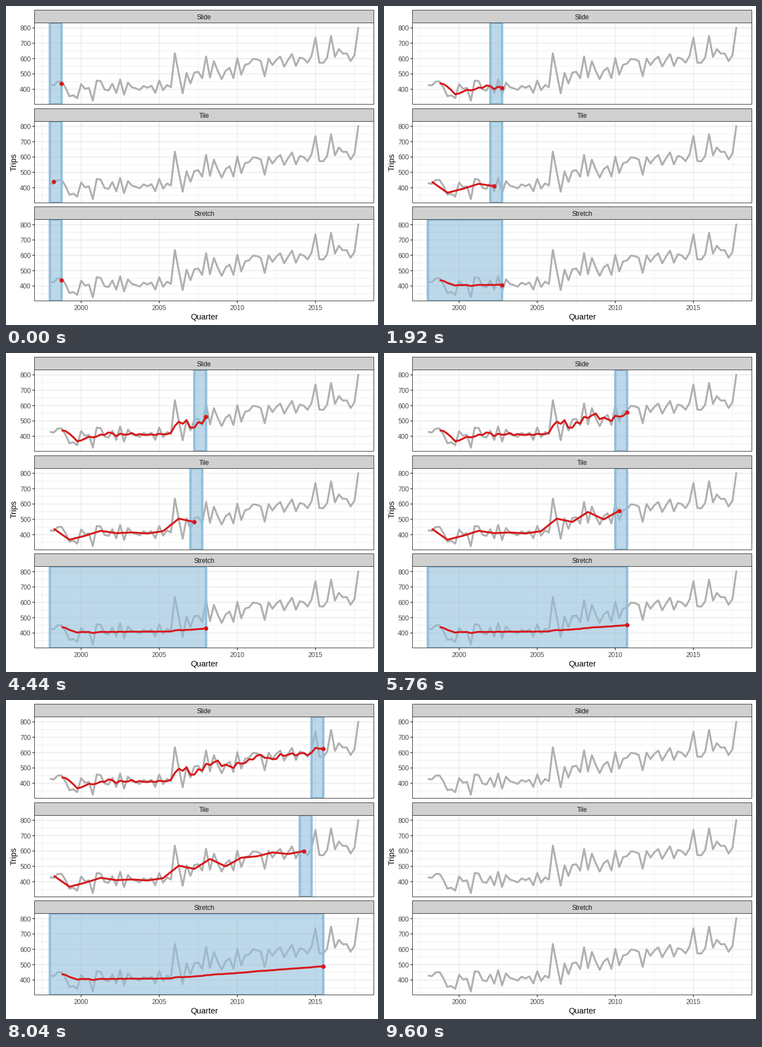
A matplotlib script that plays this animation: 672x576 px, repeating every 9720 ms.

```python
import numpy as np
import matplotlib.pyplot as plt
from matplotlib.animation import FuncAnimation
from matplotlib.patches import Rectangle

W, H, DPI = 672, 576, 96
PX = 72 / DPI  # one pixel in points
FRAMES, INTERVAL = 81, 120
SPAN = 4  # quarters per window

plt.rcParams["font.family"] = "Liberation Sans"
plt.rcParams["path.snap"] = False

LEFT, RIGHT, PANEL_H, STRIP_H = 51.5, 664.5, 147, 23
TOPS = (30.5, 208.2, 385.7)
DARK, GRID, GREY = "#383838", "#E8E8E8", "#B0B0B0"
BLUE, RED = "#91BFDB", "#D7191C"

trips = np.array([
    429, 425, 450, 451, 411, 355, 361, 342, 434, 403, 409, 326,
    457, 453, 399, 392, 436, 376, 464, 365, 443, 414, 406, 396,
    422, 410, 423, 377, 457, 394, 428, 414, 635, 502, 374, 507,
    438, 509, 514, 472, 614, 477, 583, 519, 466, 520, 540, 473,
    603, 495, 560, 567, 598, 595, 584, 485, 600, 558, 592, 613,
    548, 592, 630, 552, 607, 599, 573, 617, 737, 574, 572, 606,
    748, 611, 662, 633, 634, 584, 622, 806])
quarters = 1998 + np.arange(len(trips)) / 4

sums = np.cumsum(trips)
slide = np.convolve(trips, np.ones(SPAN) / SPAN, "valid")
tile = trips.reshape(-1, SPAN).mean(axis=1)
stretch = (sums / np.arange(1, len(trips) + 1))[SPAN - 1:]


def x_of(year):
    return 79.25 + 28.22 * (np.asarray(year) - 1998)


def y_of(value, top):
    return top + 119.9 - 0.2772 * (np.asarray(value) - 400)


fig = plt.figure(figsize=(W / DPI, H / DPI), dpi=DPI, facecolor="white")
ax = fig.add_axes([0, 0, 1, 1])
ax.set_xlim(0, W)
ax.set_ylim(H, 0)
ax.axis("off")


def line(xs, ys, color, width, z, clip=None):
    artist, = ax.plot(xs, ys, color=color, lw=width * PX, zorder=z,
                      solid_capstyle="butt", solid_joinstyle="round")
    if clip is not None:
        artist.set_clip_path(clip)
    return artist


def label(x, y, text, px, color, ha="center", **kw):
    ax.text(x, y, text, fontsize=px * PX, color=color, ha=ha,
            va="baseline", **kw)


def box(top, height, fill, z):
    patch = Rectangle((LEFT, np.floor(top) + 0.5), RIGHT - LEFT, height,
                      fc=fill, ec=DARK, lw=PX, zorder=z)
    return ax.add_patch(patch)


class Panel:
    def __init__(self, top, title, xs, means):
        self.top = top
        self.xs, self.ys = x_of(xs), y_of(means, top)
        bottom = top + PANEL_H
        clip = Rectangle((LEFT, top), RIGHT - LEFT, PANEL_H,
                         transform=ax.transData)

        for year in np.arange(1997.5, 2018, 2.5):
            width = 1.42 if year % 5 == 0 else 0.71
            line([x_of(year)] * 2, [top, bottom], GRID, width, 1)
        for value in range(350, 801, 50):
            major = value % 100 == 0
            y = y_of(value, top)
            line([LEFT, RIGHT], [y, y], GRID, 1.42 if major else 0.71, 1)
            if major:
                line([LEFT - 3.7, LEFT], [y, y], DARK, 1.42, 1)
                label(45, y + 4.8, str(value), 11.73, "#454545", "right")

        line(x_of(quarters), y_of(trips, top), GREY, 3.41, 2, clip)
        self.fill = ax.add_patch(Rectangle((0, top), 0, PANEL_H, fc=BLUE,
                                           alpha=0.6, lw=0, zorder=3))
        self.edge = ax.add_patch(Rectangle((0, top), 0, PANEL_H, fill=False,
                                           ec=BLUE, lw=4.27 * PX, zorder=4))
        self.edge.set_clip_path(clip)
        self.path = line([], [], RED, 3.41, 5, clip)
        self.dot, = ax.plot([], [], "o", color=RED, ms=7.7 * PX, mew=0,
                            zorder=6)

        box(top, PANEL_H, "none", 7)
        box(top - STRIP_H, STRIP_H, "#D0D0D0", 7)
        label(357.8, top - 6.4, title, 11.73, "#151515", zorder=8)

    def show(self, step, first, last):
        """Mark quarters first..last and draw the means up to step."""
        visible = step < len(self.xs)
        for artist in self.artists():
            artist.set_visible(visible)
        if not visible:
            return
        x0, x1 = x_of(quarters[[first, last]])
        for rect in (self.fill, self.edge):
            rect.set_x(x0)
            rect.set_width(x1 - x0)
        self.path.set_data(self.xs[:step + 1], self.ys[:step + 1])
        self.dot.set_data([self.xs[step]], [self.ys[step]])

    def artists(self):
        return [self.fill, self.edge, self.path, self.dot]


ends = quarters[SPAN - 1:]
panels = [Panel(TOPS[0], "Slide", ends, slide),
          Panel(TOPS[1], "Tile", quarters[1::SPAN], tile),
          Panel(TOPS[2], "Stretch", ends, stretch)]

floor = TOPS[2] + PANEL_H
for year in range(2000, 2016, 5):
    line([x_of(year)] * 2, [floor, floor + 3.7], DARK, 1.42, 1)
    label(x_of(year), 548.6, str(year), 11.73, "#454545")
label(357.8, 566.2, "Quarter", 14.67, "black")
ax.text(18.2, 282, "Trips", fontsize=14.67 * PX, rotation=90,
        rotation_mode="anchor", ha="center", va="baseline")


def update(i):
    block = i // SPAN
    last = i + SPAN - 1
    panels[0].show(i, i, last)
    panels[1].show(block, block * SPAN, block * SPAN + SPAN - 1)
    panels[2].show(i, 0, last)
    return [a for p in panels for a in p.artists()]


anim = FuncAnimation(fig, update, frames=FRAMES, interval=INTERVAL,
                     repeat=True, repeat_delay=0)
plt.show()
```
